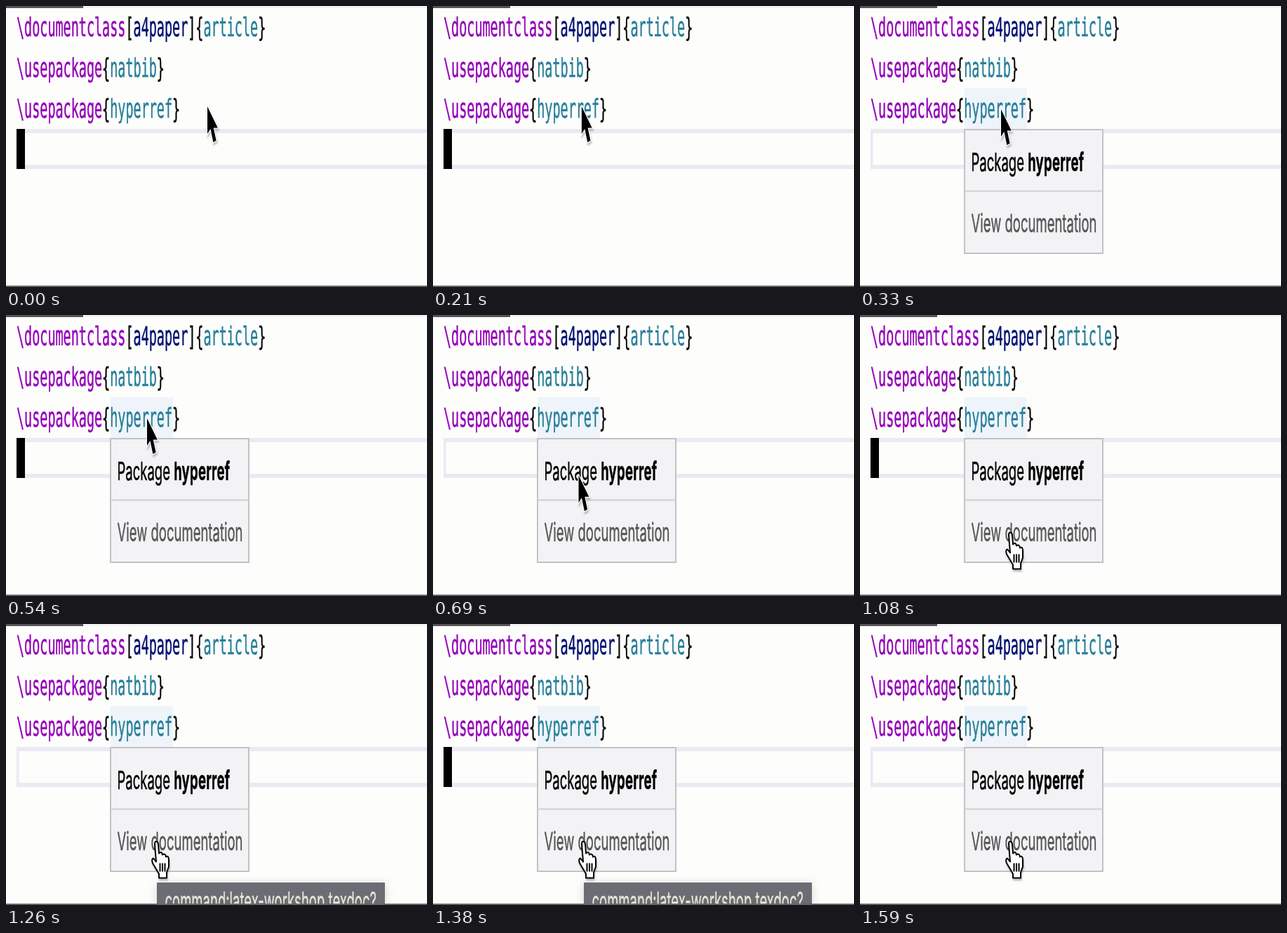
Write an HTML page that moves like this. It is 600 by 400 pixels and loops after 1620 ms.

```html
<!DOCTYPE html>
<html lang="en">
<head>
<meta charset="utf-8">
<style>
  html, body { margin: 0; width: 100%; height: 100%; overflow: hidden; background: #fdfdfc; }
  svg { display: block; width: 600px; height: 400px; }
  text, tspan { fill: currentColor; stroke: currentColor; }
  .code { font: 36.9px "DejaVu Sans Mono", monospace; color: #000; stroke-width: .6; }
  .ui { font: 36px Inter, sans-serif; color: #000; stroke-width: .5; }
  .cmd { color: #9400b8; }
  .opt { color: #001070; }
  .arg { color: #267f99; }
  .name { font-weight: 700; letter-spacing: .5px; }
  #arrow, #hand { filter: drop-shadow(1px 3px 1px #6666); }
</style>
</head>
<body>
<svg viewBox="0 0 600 400">
  <rect width="600" height="400" fill="#fdfdfc"/>
  <path d="M110 1.5H600" stroke="#f3f3f3" stroke-width="3"/>
  <path d="M0 1.5H110" stroke="#555" stroke-width="3"/>

  <!-- current line and text cursor -->
  <path d="M15 175H600V181H18.5V226H600V232H15Z" fill="#eaeaf3"/>
  <rect id="caret" x="15" y="175" width="12" height="57"/>
  <rect id="mark" x="149" y="117" width="89" height="58" fill="#eef4fa"/>

  <g class="code" transform="translate(15 0) scale(.5 1)">
    <text y="43.5"><tspan class="cmd">\documentclass</tspan>[<tspan class="opt">a4paper</tspan>]{<tspan class="arg">article</tspan>}</text>
    <text y="101.5"><tspan class="cmd">\usepackage</tspan>{<tspan class="arg">natbib</tspan>}</text>
    <text y="159.5"><tspan class="cmd">\usepackage</tspan>{<tspan class="arg">hyperref</tspan>}</text>
  </g>

  <g id="popup">
    <rect x="149" y="176" width="197" height="176" fill="#f3f3f6" stroke="#c2c2c6" stroke-width="2"/>
    <path d="M149 263.5H346" stroke="#d0d0d4" stroke-width="2"/>
    <g class="ui" transform="translate(158.5 0) scale(.514 1)">
      <text y="235">Package <tspan class="name">hyperref</tspan></text>
      <text y="322.5" color="#555">View documentation</text>
    </g>
  </g>

  <g id="hint">
    <rect x="215" y="368" width="325" height="32" fill="#6c6c74" style="filter: drop-shadow(0 2px 7px #8885)"/>
    <g class="ui" transform="translate(226.5 0) scale(.514 1)">
      <text y="407" color="#e6e6d8">command:latex-workshop.texdoc?</text>
    </g>
  </g>
  <path d="M0 399H600" stroke="#666" stroke-width="2"/>

  <path id="arrow" d="M0 0V39L4.4 32L8.4 51L12.6 48.5L8.8 30.5H14.8Z" stroke="#fff" stroke-width="2.4" paint-order="stroke"/>
  <g id="hand" stroke="#000" stroke-width="2" stroke-linejoin="round">
    <path d="M-2 4Q-2 0 0 0Q2.5 0 3 4L4 17Q8 13 9 19Q13 16 14 22Q18 19 18 27V36L15 44V52H4V46L-5 31Q-7 25 -4 24L0 29Z" fill="#fff"/>
    <path d="M5.5 31V43M9 31V43M12.5 31V43"/>
  </g>
</svg>
<script>
  const LOOP = 1620, STEP = 30, BLINK = 300;
  const [caret, mark, popup, hint, arrow, hand] =
    ["caret", "mark", "popup", "hint", "arrow", "hand"].map(id => document.getElementById(id));
  const progress = (t, from, to) => Math.min(1, Math.max(0, (t - from) / (to - from)));
  const smooth = p => p * p * (3 - 2 * p);
  const show = (el, on) => el.setAttribute("visibility", on ? "visible" : "hidden");

  function draw(t) {
    const glide = smooth(progress(t, 0, 270));
    const drop = smooth(progress(t, 570, 810));
    const x = 287 - 86 * glide + 13 * drop;
    const y = 143 + 4 * progress(t, 210, 270) + 162.5 * drop;
    const onLink = y > 270;

    for (const el of [arrow, hand]) el.setAttribute("transform", `translate(${x} ${y})`);
    show(arrow, !onLink);
    show(hand, onLink);
    show(mark, t >= 300);
    show(popup, t >= 300);
    show(caret, (t + BLINK - STEP) % BLINK >= BLINK / 2);
    hint.setAttribute("opacity", progress(t, 1110, 1170) * (1 - progress(t, 1470, 1560)));
  }

  const start = performance.now();
  function tick() {
    const t = (performance.now() - start) % LOOP;
    draw(Math.floor(t / STEP) * STEP);
    requestAnimationFrame(tick);
  }
  tick();
</script>
</body>
</html>
```
